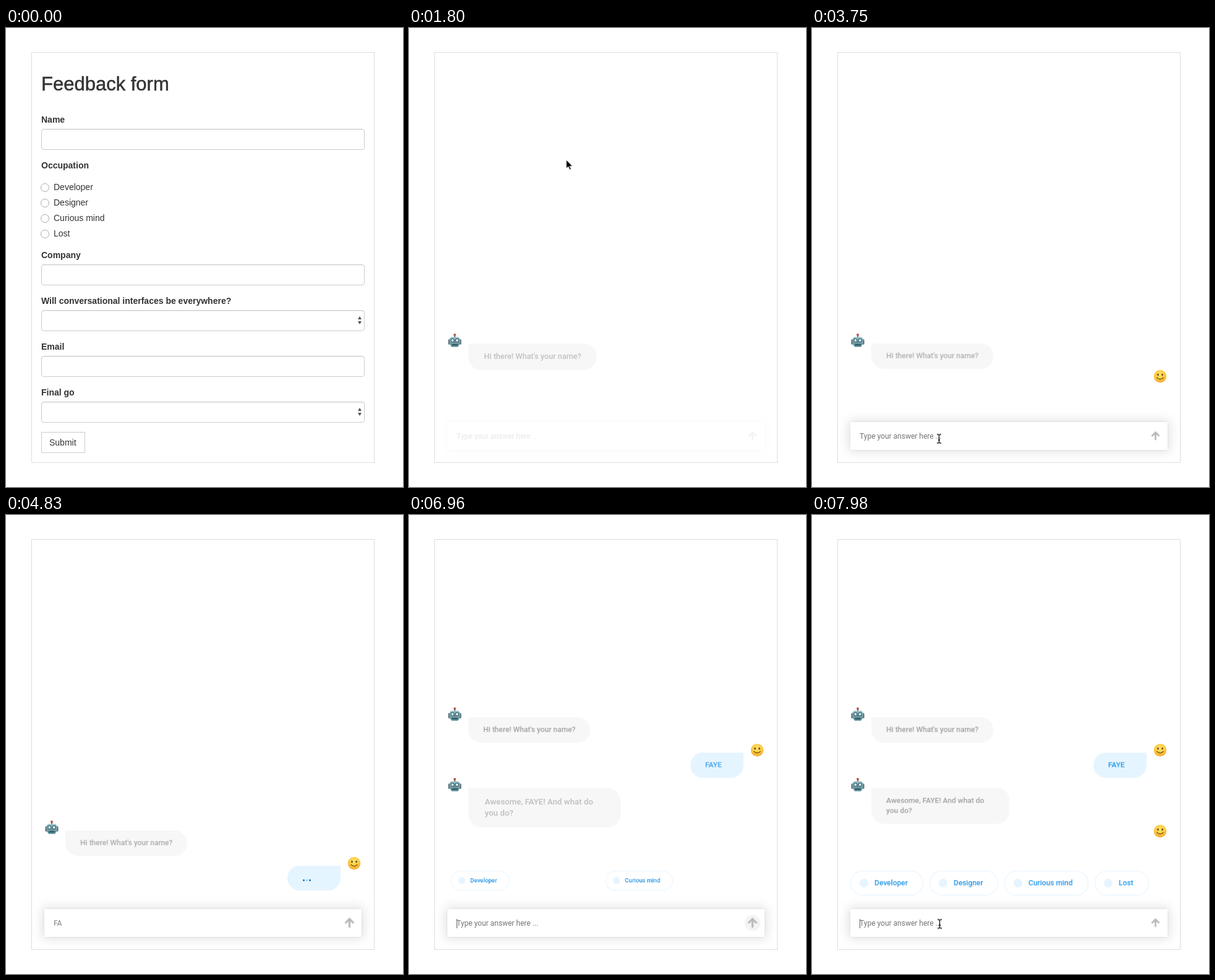
Write an HTML page that moves like this. It is 642 px wide and 742 px high and loops after 8000 ms.

```html
<!DOCTYPE html>
<html lang="en">
<head>
<meta charset="utf-8">
<title>Feedback form</title>
<style>
html, body { margin: 0; width: 100%; height: 100%; overflow: hidden; background: #fff; }
#stage { position: relative; width: 642px; height: 742px; overflow: hidden; background: #fff; }
#stage div, #stage svg, .dots i, .abs { position: absolute; box-sizing: border-box; white-space: nowrap; }
#panel { left: 41px; top: 39px; width: 555px; height: 664px; border: 1px solid #ddd; }
/* One shared 8 s timeline: 1% = 80 ms */
.anim { animation: 8s linear infinite both; }
.hard { animation-timing-function: step-end; }

#form { inset: 0; color: #333; font: 14px/20px "Liberation Sans", Arial, sans-serif; animation-name: formOut; }
#form h1 { position: absolute; left: 57px; top: 74px; margin: 0; font: 31px/34px "Liberation Sans", Arial, sans-serif; -webkit-text-stroke: .5px #333; white-space: nowrap; }
.label { left: 57px; font-weight: bold; }
.option { left: 77px; }
.option::before { content: ""; position: absolute; left: -21px; top: 4px; width: 12px; height: 12px; border: 1px solid #aaa; border-radius: 50%; }
.field { left: 57px; width: 523px; height: 34px; border: 1px solid #ccc; border-radius: 4px; box-shadow: inset 0 1px 1px rgba(0,0,0,.075); }
.select::before, .select::after { content: ""; position: absolute; right: 4px; border: 3.5px solid transparent; }
.select::before { top: 6px; border-bottom: 5px solid #555; }
.select::after { top: 17px; border-top: 5px solid #555; }
#submit { left: 57px; top: 653px; width: 71px; height: 34px; border: 1px solid #ccc; padding: 6px 12px; }
@keyframes formOut { 0%, 9.75% { opacity: 1 } 12.75% { opacity: .045 } 13.5%, 100% { opacity: 0 } }

#chat { inset: 0; font: 500 12px/17px Roboto, sans-serif; animation-name: scroll; }
@keyframes scroll {
  0%, 75.625% { transform: none; animation-timing-function: ease-in }
  79.125% { transform: translateY(-150px); animation-timing-function: ease-out }
  81%, 84% { transform: translateY(-166px); animation-timing-function: ease-out }
  86.25%, 100% { transform: translateY(-183px) }
}
.face { width: 24px; height: 24px; }
.robot { left: 62px; }
.smile { left: 551px; }
.bubble { min-width: 86px; padding: 12px 24px; border-radius: 20px; }
.bot { left: 96px; border-top-left-radius: 0; background: #f7f7f7; color: #a0a0a0; transform-origin: 0 0; --clear: rgba(160,160,160,0); --half: rgba(160,160,160,.65); }
.user { right: 101px; border-top-right-radius: 0; background: #e5f5ff; color: #2196e8; transform-origin: 100% 0; --clear: rgba(33,150,232,0); --half: rgba(33,150,232,.7); }
.dots { height: 40px; width: 86px; }
.dots i { top: 22px; left: calc(25px + var(--n) * 5px); width: 2.5px; height: 2.5px; border-radius: 1px; background: currentColor; filter: brightness(.9); animation: blink 1s linear infinite; animation-delay: calc(-790ms + var(--n) * 115ms); }
@keyframes blink { 0%, 42%, 58%, 100% { opacity: 1 } 50% { opacity: .25 } }

#row1 { inset: 0; animation-name: row1; }
@keyframes row1 {
  0%, 11.24% { opacity: 0; transform: translateY(24px) }
  11.25% { opacity: 1; transform: translateY(24px); animation-timing-function: ease-out }
  12.75% { opacity: 1; transform: translateY(4px); animation-timing-function: ease-out }
  14.5%, 100% { opacity: 1; transform: none }
}
#dots1 { animation-name: dots1; }
#dots2 { animation-name: dots2; }
#dots3 { animation-name: dots3; }
@keyframes dots1 { 0% { opacity: 1 } 20%, 100% { opacity: 0 } }
@keyframes dots2 { 0% { opacity: 0 } 48.125% { opacity: 1 } 76.125%, 100% { opacity: 0 } }
@keyframes dots3 { 0% { opacity: 0 } 76.875% { opacity: 1 } 84%, 100% { opacity: 0 } }
#robot2 { animation-name: robot2; }
#smile1 { animation-name: smile1; }
#smile2 { animation-name: smile2; }
@keyframes robot2 { 0%, 76.875% { opacity: 0 } 78%, 100% { opacity: 1 } }
@keyframes smile1 { 0%, 27.875% { opacity: 0 } 29.5%, 100% { opacity: 1 } }
@keyframes smile2 { 0%, 91.875% { opacity: 0 } 93.5%, 100% { opacity: 1 } }

/* Pops overshoot to 1.1, then settle */
.pop { animation-timing-function: ease-out; }
#say1 { animation-name: say1; }
#say2 { animation-name: say2; }
#say3 { animation-name: say3; }
@keyframes say1 { 0%, 20% { transform: scale(0); color: var(--clear) } 23% { transform: scale(1.1); color: var(--half) } 25.5%, 100% { transform: none } }
@keyframes say2 { 0%, 76.125% { transform: scale(0); color: var(--clear) } 79.125% { transform: scale(1.105); color: var(--half) } 81.625%, 100% { transform: none } }
@keyframes say3 { 0%, 84% { transform: scale(0); color: var(--clear) } 87% { transform: scale(1.107); color: var(--half) } 89.5%, 100% { transform: none } }

.choice { top: 575px; height: 40px; padding: 11px 0 0 38px; border: 1px solid #e3f3fe; border-radius: 20px; color: #2196e8; font: 500 12px/17px Roboto, sans-serif; transform-origin: 25% 0; animation-name: choiceA; }
.choice.late { animation-name: choiceB; }
.choice::before { content: ""; position: absolute; left: 14px; top: 12px; width: 14px; height: 14px; border-radius: 50%; background: #e5f4fe; }
@keyframes choiceA { 0%, 85.75% { transform: scale(0) } 87% { transform: scale(.8) } 88.75% { transform: scale(1.06) } 90.75%, 100% { transform: none } }
@keyframes choiceB { 0%, 87% { transform: scale(0) } 88.25% { transform: scale(.8) } 90% { transform: scale(1.06) } 92%, 100% { transform: none } }

#input { left: 62px; top: 637px; width: 513px; height: 45px; background: #fff; box-shadow: 0 0 3px rgba(0,0,0,.1), 0 0 18px 3px rgba(0,0,0,.12); font: 12px/17px Roboto, sans-serif; animation-name: inputIn; }
@keyframes inputIn { 0%, 21.875% { opacity: 0 } 25.5%, 100% { opacity: 1 } }
#input .abs { left: 15px; top: 15px; }
#hint { color: #737578; animation-name: hint; }
@keyframes hint { 0% { opacity: 1 } 48.125% { opacity: 0 } 71.875%, 100% { opacity: 1 } }
#typed { color: #999; font-weight: 500; }
#typed b { font-weight: inherit; }
#typed b:nth-child(1) { animation-name: key1; }
#typed b:nth-child(2) { animation-name: key2; }
#typed b:nth-child(3) { animation-name: key3; }
#typed b:nth-child(4) { animation-name: key4; }
@keyframes key1 { 0% { opacity: 0 } 48.125% { opacity: 1 } 71.875%, 100% { opacity: 0 } }
@keyframes key2 { 0% { opacity: 0 } 56.25% { opacity: 1 } 71.875%, 100% { opacity: 0 } }
@keyframes key3 { 0% { opacity: 0 } 63.75% { opacity: 1 } 71.875%, 100% { opacity: 0 } }
@keyframes key4 { 0% { opacity: 0 } 67.5% { opacity: 1 } 71.875%, 100% { opacity: 0 } }
#focus { inset: 0; animation-name: focus; }
@keyframes focus { 0% { opacity: 0 } 32.5% { opacity: 1 } 48.125% { opacity: 0 } 71.875%, 100% { opacity: 1 } }
#caret { left: 15px; top: 16px; width: 1px; height: 15px; background: #555; animation: caret 1s step-end infinite; }
@keyframes caret { 0% { opacity: 1 } 40% { opacity: 0 } 90%, 100% { opacity: 1 } }
#send { left: 480px; top: 9px; width: 27px; height: 27px; }
#halo { animation-name: halo; }
@keyframes halo { 0%, 71.875% { opacity: 0 } 73.5%, 90% { opacity: 1 } 93%, 100% { opacity: 0 } }
#send path { transform-origin: 13.5px 13.5px; animation-name: send; }
@keyframes send { 0%, 48.125% { transform: none } 49.5%, 90% { transform: scale(1.14) } 93%, 100% { transform: none } }

#arrow { left: 0; top: 0; width: 14px; height: 20px; animation-name: arrow; }
@keyframes arrow {
  0%, 9.75% { transform: translate(286px, -22px); opacity: 1; animation-timing-function: ease-out }
  12.75% { transform: translate(271px, 64px) }
  20.25% { transform: translate(267px, 86px); animation-timing-function: ease-in-out }
  27.1% { transform: translate(207px, 640px); opacity: 1 }
  27.11%, 100% { transform: translate(207px, 640px); opacity: 0 }
}
#beam { left: 0; top: 0; width: 9px; height: 17px; animation-name: beam; }
@keyframes beam {
  0%, 27.1% { transform: translate(203px, 640px); opacity: 0 }
  27.11% { transform: translate(203px, 640px); opacity: 1; animation-timing-function: ease-out }
  29.5%, 48.12% { transform: translate(201px, 655.5px); opacity: 1 }
  48.125%, 96.24% { transform: translate(202px, 652.5px); opacity: 0 }
  96.25%, 100% { transform: translate(202px, 652.5px); opacity: 1 }
}
</style>
</head>
<body>
<svg width="0" height="0" style="position:absolute">
  <defs>
    <linearGradient id="metal" x2="0" y2="1"><stop stop-color="#9cc3c9"/><stop offset="1" stop-color="#4f8794"/></linearGradient>
    <radialGradient id="sun" cy=".35" r=".7"><stop stop-color="#ffe36a"/><stop offset=".65" stop-color="#fcc53b"/><stop offset="1" stop-color="#ec9526"/></radialGradient>
    <symbol id="robot" viewBox="0 0 24 24">
      <path d="M12 3v5" stroke="#77665f" stroke-width="2"/>
      <circle cx="12" cy="3" r="2" fill="#b4574a"/>
      <path d="M2.7 11.5v6M21.3 11.5v6" stroke="#596b74" stroke-width="2.4" stroke-linecap="round"/>
      <path d="M6 6.5h12l2.5 3v8l-3.5 5H7l-3.500-5v-8z" fill="url(#metal)"/>
      <g fill="#d8f3f5" stroke="#416a75" stroke-width="1.3"><circle cx="8.300" cy="12" r="2.600"/><circle cx="15.700" cy="12" r="2.600"/></g>
      <path d="M12 13.500l-1.300 2.500h2.600z" fill="#a9574e"/>
      <path d="M7.500 19h9" stroke="#315660" stroke-width="2.200"/>
    </symbol>
    <symbol id="smile" viewBox="0 0 24 24">
      <circle cx="12" cy="12" r="10.200" fill="url(#sun)"/>
      <g fill="#65450f"><ellipse cx="8.500" cy="9.500" rx="1.300" ry="1.800"/><ellipse cx="15.500" cy="9.500" rx="1.300" ry="1.800"/></g>
      <path d="M6.800 14.300q5.200 4.800 10.400 0" fill="none" stroke="#7a5212" stroke-width="1.400" stroke-linecap="round"/>
    </symbol>
  </defs>
</svg>
<div id="stage">
  <div id="panel"></div>

  <div id="form" class="anim">
    <h1>Feedback form</h1>
    <div class="label" style="top:138px">Name</div>
    <div class="field" style="top:163px"></div>
    <div class="label" style="top:212px">Occupation</div>
    <div class="option" style="top:247px">Developer</div>
    <div class="option" style="top:272px">Designer</div>
    <div class="option" style="top:297px">Curious mind</div>
    <div class="option" style="top:322px">Lost</div>
    <div class="label" style="top:357px">Company</div>
    <div class="field" style="top:382px"></div>
    <div class="label" style="top:431px">Will conversational interfaces be everywhere?</div>
    <div class="field select" style="top:456px"></div>
    <div class="label" style="top:505px">Email</div>
    <div class="field" style="top:530px"></div>
    <div class="label" style="top:579px">Final go</div>
    <div class="field select" style="top:604px"></div>
    <div id="submit">Submit</div>
  </div>

  <div id="chat" class="anim">
    <div id="row1" class="anim">
      <svg class="face robot" style="top:493px"><use href="#robot"/></svg>
      <div id="dots1" class="bubble bot dots anim hard" style="top:510px"><i style="--n:0"></i><i style="--n:1"></i><i style="--n:2"></i></div>
      <div id="say1" class="bubble bot anim pop" style="top:510px">Hi there! What's your name?</div>
    </div>
    <svg id="smile1" class="face smile anim" style="top:551px"><use href="#smile"/></svg>
    <div id="dots2" class="bubble user dots anim hard" style="top:567px"><i style="--n:0"></i><i style="--n:1"></i><i style="--n:2"></i></div>
    <div id="say2" class="bubble user anim pop" style="top:567px">FAYE</div>
    <svg id="robot2" class="face robot anim" style="top:607px"><use href="#robot"/></svg>
    <div id="dots3" class="bubble bot dots anim hard" style="top:624px"><i style="--n:0"></i><i style="--n:1"></i><i style="--n:2"></i></div>
    <div id="say3" class="bubble bot anim pop" style="top:624px;width:223px">Awesome, FAYE! And what do<br>you do?</div>
    <svg id="smile2" class="face smile anim" style="top:682px"><use href="#smile"/></svg>
  </div>

  <div class="choice anim" style="left:62px;width:118px">Developer</div>
  <div class="choice anim late" style="left:190px;width:111px">Designer</div>
  <div class="choice anim" style="left:311px;width:136px">Curious mind</div>
  <div class="choice anim late" style="left:457px;width:88px">Lost</div>

  <div id="input" class="anim">
    <span id="hint" class="abs anim hard">Type your answer here ...</span>
    <span id="typed" class="abs"><b class="anim hard">F</b><b class="anim hard">A</b><b class="anim hard">Y</b><b class="anim hard">E</b></span>
    <div id="focus" class="anim hard"><div id="caret"></div></div>
    <svg id="send" viewBox="0 0 27 27">
      <circle id="halo" class="anim" cx="13.500" cy="13.500" r="13" fill="#f4f4f4"/>
      <path class="anim" d="M13.500 20V8.500M7.500 13.800l6-6 6 6" fill="none" stroke="#b9b9b9" stroke-width="2.800"/>
    </svg>
  </div>

  <svg id="arrow" class="anim" viewBox="0 0 14 20"><path d="M1 1v14l3.300-3 2.300 5.300 2.300-1-2.300-5h4.400z" fill="#000" stroke="#fff" stroke-width=".8"/></svg>
  <svg id="beam" class="anim" viewBox="0 0 9 17"><path d="M1 1.500h2l1.500 1.200L6 1.500h2M4.500 2.500v12M1 15.500h2l1.500-1.200L6 15.500h2M3 10.500h3" fill="none" stroke="#111" stroke-width="1.300"/></svg>
</div>
</body>
</html>
```
